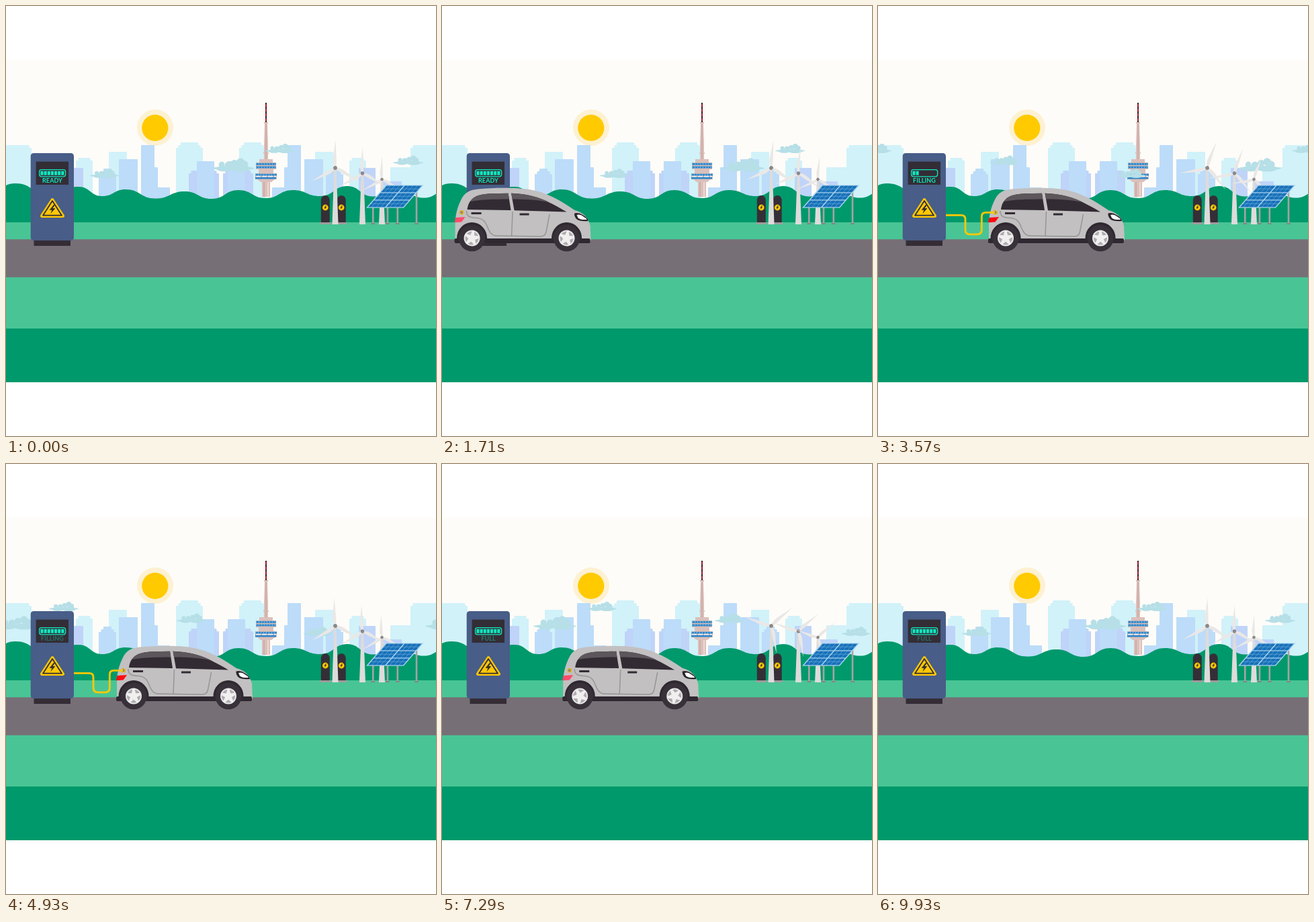
These frames come from a looping animation (640 px wide and 640 px high, 10 s). An HTML page:

```html
<!DOCTYPE html>
<html lang="en">
<head>
<meta charset="utf-8">
<title>Charging station</title>
<style>
html, body { margin: 0; width: 100%; height: 100%; overflow: hidden; background: #fff; }
svg { display: block; width: 100vw; height: 100vh; }
text { font: 700 9px Lato, sans-serif; letter-spacing: .1px; text-anchor: middle; fill: #0fe8c0; }
</style>
</head>
<body>
<svg viewBox="0 0 640 640">
  <defs>
    <g id="cloud" fill="#b6dfe7">
      <ellipse cy="4.5" rx="32" ry="2.8"/>
      <ellipse cx="-13" cy="5" rx="12" ry="4.2"/>
      <ellipse cx="11" cy="5" rx="15" ry="4.6"/>
      <circle cx="-17" cy="-1" r="4.4"/>
      <circle cx="-7" r="5.4"/>
      <circle cx="2" cy="-3" r="5"/>
      <circle cx="11" cy="-5" r="5.8"/>
      <circle cx="17" cy="-1" r="5.4"/>
    </g>
    <path id="blade" d="M-1.5 0C-2-4-4-8-3.6-13L.4-42L1.8-12L1.5 0Z"/>
    <path id="bolt" d="M1.6-6L-4 1.2H-.6L-2.4 6.2L4-1.4H.6L3.6-6Z"/>
    <path id="arch" d="M-22.500 2V0A22.500 23.500 0 0 1 22.500 0V2Z" fill="#2f2830"/>
    <pattern id="cells" width=".125" height=".1667" patternUnits="userSpaceOnUse">
      <rect width=".125" height=".1667" fill="#5fa9dc"/>
      <rect width=".112" height=".142" fill="#1870b8"/>
    </pattern>
  </defs>

  <rect y="80" width="640" height="480" fill="#fefcf8"/>
  <circle cx="222" cy="181" r="27" fill="#fdf1d2"/>
  <circle cx="221.800" cy="181.400" r="19.600" fill="#ffca00"/>
  <g id="city"></g>
  <use href="#city" transform="translate(640) scale(-1 1)"/>

  <g id="tower" fill="#dbc0bb">
    <path d="M387 144V173" stroke="#33202a" stroke-width="2"/>
    <path d="M387 146V173" stroke="#a51c2a" stroke-width="2" stroke-dasharray="4 3"/>
    <path d="M384 173h6v2h-1L390 206V228H384V206L385 175h-1Z"/>
    <path d="M383 218h8v2h-8ZM377 228h20v5h-20ZM372 233h30v10h-30ZM376 243h22v6h-22ZM371 249h32v9h-32ZM374 258h26l-5 4h-16ZM381 262h12v22h-12Z"/>
    <path d="M387 176V228M384 262V284" stroke="#c9a7a3" stroke-width="1.5"/>
    <path d="M390 262V284" stroke="#ecd9d5" stroke-width="2"/>
    <path d="M372 235.200h30m-30 4.800h30m-31 11.200h32m-32 4.800h31" stroke="#2f86c9" stroke-width="3"/>
    <path d="M372 235.200h30m-30 4.800h30m-31 11.200h32" stroke="#8fc7ea" stroke-width="1.4" stroke-dasharray="1 3"/>
    <path d="M372 253.600h30" stroke="#f6eeee" stroke-width="1.6" stroke-dasharray="7 2"/>
  </g>
  <g id="clouds"></g>
  <path id="hills" fill="#00996b"/>
  <path d="M0 322H640V482H0Z" fill="#49c595"/>
  <path d="M0 347.300H640V403.700H0Z" fill="#766f76"/>
  <path d="M0 480H640V560H0Z" fill="#00996b"/>

  <g id="pumps"></g>
  <g id="turbines"></g>
  <path d="M546.300 298v27M568 298v27M582.800 298v27M611 274v51" stroke="#a5a3a5" stroke-width="2.6"/>
  <path d="M543.500 324h5.600m16 0h5.600m9.300 0h5.600m22.600 0h5.600" stroke="#858285" stroke-width="2"/>
  <g transform="matrix(54 0 -28.500 33 566 267)">
    <rect width="1" height="1" fill="url(#cells)"/>
    <path d="M.5 0V1M0 .333H1M0 .667H1M0 0H1V1H0Z" fill="none" stroke="#a9d3ee" stroke-width=".035"/>
  </g>

  <rect x="41.500" y="345" width="54.500" height="12" fill="#352d36"/>
  <rect x="36.700" y="219" width="64.300" height="130" rx="4.500" fill="#485d87"/>
  <rect x="44.600" y="231.600" width="48.400" height="34.400" fill="#332d35"/>
  <rect x="49.600" y="243.600" width="39" height="10.200" rx="3" fill="none" stroke="#0fe8c0" stroke-width="1.3"/>
  <path id="charge" d="M51.400 248.800h36" stroke="#0fe8c0" stroke-width="6.100"/>
  <text id="label" x="69" y="263.200"></text>
  <path d="M69 288.500L53.300 312.500H84.700Z" fill="#ffc800" stroke="#ffc800" stroke-width="4.800" stroke-linejoin="round"/>
  <path d="M69 290L55 311.700H83Z" fill="none" stroke="#332d35" stroke-width="1.800" stroke-linejoin="round"/>
  <use href="#bolt" transform="translate(69 302.500) scale(1.100)" fill="#332d35"/>

  <g id="car">
    <path d="M131 349V325C131 312 134 300 140 288C145 278 152 274 165 272.600C190 270 222 270 241 273C268 277 288 290 309 304C321 307 329 314 332 327L333 349Z" fill="#c2c0c1"/>
    <rect x="130" y="346" width="202" height="7" rx="2" fill="#2f2830"/>
    <path d="M149 303C151 288 160 280.500 184 279.300L210 278.800L214 304ZM214.500 278.800C246 280 264 287 297 306.500L219 304.300Z" fill="#332b33"/>
    <path d="M153.500 291C158 283 167 280 184 279.300L210 278.800L211.300 287.500C188 287.500 168 288 153.500 291ZM214.500 278.800C240 280 256 284.500 271 292C250 288 234 287.600 216.200 287.500Z" fill="#5d575c"/>
    <path d="M148 305C148 313 152 315 163 315.500C179 316.500 177 330 184 338Q187 341.800 193 342L258 343Q265 343 266.500 336L271.500 310M216.500 306L215 342" fill="none" stroke="#979597" stroke-width="1.500"/>
    <path d="M155 307h15v3h-15ZM227 308.500h14v3h-14Z" fill="#332b33"/>
    <path d="M308.500 308.500Q315 306.500 321 311Q328.500 315 329 320Q316 321 311.500 317Q308 313 308.500 308.500Z" fill="#2b252b"/>
    <path d="M312 311Q317 309 322 313.500Q326 315.500 327 318Q317 318.500 314 315.500Z" fill="#fff"/>
    <path id="tail" d="M131.500 315L146 314L140.500 321.500L130 322.300Z"/>
    <circle cx="140.500" cy="307.200" r="2.600" fill="#8d8a8c" stroke="#edb400" stroke-width="1.300"/>
  </g>
  <path id="cable" pathLength="100" stroke-dasharray="100 200" d="M101 311.300h23q6 0 6 6v16q0 6.500 6.500 6.500h11.300q6.500 0 6.500-6.500v-20q0-6 6-6H174" fill="none" stroke="#ffc800" stroke-width="2.800"/>
</svg>
<script>
const NS = 'http://www.w3.org/2000/svg';
const $ = id => document.getElementById(id);
const add = (parent, tag, attrs = {}) => {
  const el = document.createElementNS(NS, tag);
  for (const k in attrs) el.setAttribute(k, attrs[k]);
  return parent.appendChild(el);
};
const move = (el, x, y = 0) => el.setAttribute('transform', `translate(${x} ${y})`);
const turn = (el, a) => el.setAttribute('transform', `rotate(${a})`);
const clamp = v => Math.min(1, Math.max(0, v));
const smooth = u => u * u * (3 - 2 * u);
// Repeats a shape around its origin
const spin = (parent, n, tag, attrs) => {
  for (let i = 0; i < n; i++) turn(add(parent, tag, attrs), i * 360 / n);
};

// Half of the skyline; the other half mirrors it. A block narrows in steps towards its top.
const block = (fill, left, right, top, steps = 0) => {
  for (let i = 0; i <= steps; i++)
    add($('city'), 'rect', {
      x: left + 3.5 * i, y: top + 4 * (steps - i), width: right - left - 7 * i, height: 300 - top, rx: 1, fill
    });
};
const sky = '#d1f2f9', violet = '#bfd4f8', blue = '#bcdcf9';
block(sky, -4, 38, 207, 1);
block(sky, 35, 68, 240);
block(sky, 104, 129, 226, 1);
block(sky, 153, 180, 217);
block(sky, 253, 293, 203, 2);
block(violet, 51, 80, 261);
block(violet, 90, 115, 241);
block(violet, 272, 317, 245, 1);
block(blue, 138, 164, 242, 2);
block(blue, 168, 196, 228);
block(blue, 201, 221, 207);
block(blue, 201, 226, 240);
block(blue, 224, 244, 270);
block(blue, 284, 310, 231);

// Hills: level tangents at each crest and at the dip halfway to the next
const crests = [[-70, 270], [14, 264], [108, 269], [178, 273], [266, 276], [346, 274], [427, 274], [508, 268], [584, 275], [660, 272]];
let d = 'M-70 270';
crests.forEach(([x, y], i) => {
  if (!i) return;
  const [a, b] = crests[i - 1], m = (a + x) / 2, q = (x - a) / 4, dip = (b + y) / 2 + 12;
  d += `C${a + q} ${b} ${m - q} ${dip} ${m} ${dip}S${x - q} ${y} ${x} ${y}`;
});
$('hills').setAttribute('d', d + 'V323H-70Z');

for (const x of [475.3, 499.2]) {
  const g = add($('pumps'), 'g');
  move(g, x, 300);
  add(g, 'path', { d: 'M-8 21.500h16v3.500h-16Z', fill: '#9f9b9d' });
  add(g, 'path', { d: 'M-6.500 22V-12Q-5-18 0-18T6.500-12V22Z', fill: '#352e36' });
  add(g, 'circle', { r: 4.4, fill: '#ffc800' });
  add(g, 'use', { href: '#bolt', transform: 'scale(.5)', fill: '#352e36' });
}

const turbine = (x, y, size) => {
  const g = add($('turbines'), 'g');
  move(g, x, y);
  add(g, 'path', { d: `M-1.600 0L-4.500 ${325 - y}H4.500L1.600 0Z`, fill: '#dedbdb' });
  const rotor = add(add(g, 'g', { transform: `scale(${size})`, fill: '#eae8e6' }), 'g');
  spin(rotor, 3, 'use', { href: '#blade' });
  add(rotor, 'circle', { r: 2.9, fill: '#8b888a' });
  return rotor;
};
const rotors = [turbine(490, 241, 1), turbine(530.5, 249, .93), turbine(559.5, 258, .81)];

const wheel = x => {
  const g = add($('car'), 'g');
  move(g, x, 345.5);
  add(g, 'use', { href: '#arch' });
  add(g, 'circle', { r: 19.7, fill: '#383139' });
  const rim = add(g, 'g');
  add(rim, 'circle', { r: 11, fill: '#aeacae', stroke: '#e6e4e5', 'stroke-width': 2 });
  spin(rim, 5, 'path', { d: 'M-4 0L-1.500-11H1.500L4 0Z', fill: '#f1eff0' });
  return rim;
};
const rims = [wheel(156), wheel(297)];

const cloud = (x, y, size) => {
  const g = add($('clouds'), 'g');
  for (const shift of [0, -640])
    add(g, 'use', { href: '#cloud', transform: `translate(${shift} ${y}) scale(${size})` });
  return { g, x };
};
const clouds = [cloud(146.5, 249.5, .68), cloud(338, 237, 1), cloud(408, 212.5, .69), cloud(598.5, 230, .7)];

const LOOP = 10000, CYCLE = 9930, ARRIVE = 3000, LEAVE = 6970, DRIVE = 3000, CELLS = 7;
const PITCH = 36 / CELLS;

function draw(t) {
  const p = Math.min(t / CYCLE, 1);
  for (const { g, x } of clouds) move(g, (x + 640 * p - 50) % 640 + 50);
  for (const r of rotors) turn(r, 720 * p);

  const x = -334 + 368 * smooth(clamp(t / DRIVE)) + 478 * smooth(clamp((t - LEAVE) / DRIVE));
  move($('car'), x);
  for (const r of rims) turn(r, (x - 34) * 2.9);

  const out = 1 - clamp((t - ARRIVE) / 500), back = clamp((t - 6500) / 430);
  const reach = (1 - out * out) * (1 - back);
  $('cable').setAttribute('stroke-dashoffset', 100 - 100 * reach);
  $('cable').style.display = reach > 0 ? '' : 'none';

  const filling = t >= ARRIVE && t < LEAVE;
  const level = filling ? Math.floor((t - ARRIVE) % 2000 / 2000 * (CELLS + 1)) : CELLS;
  const bar = `${PITCH - 1} 1 `.repeat(level);
  $('charge').setAttribute('stroke-dasharray', bar + '0 99');
  $('tail').setAttribute('fill', filling && t % 1000 >= 500 ? '#ff0a12' : '#ff4a6b');

  $('label').textContent = t < ARRIVE ? 'READY' : filling ? 'FILLING' : 'FULL';
  const pulse = clamp(.6 + .5 * Math.cos(2 * Math.PI * (t / 1000 - .6)));
  $('label').style.opacity = t < ARRIVE ? 1 : pulse;
}

const start = performance.now();
function tick() {
  draw((performance.now() - start) % LOOP);
  requestAnimationFrame(tick);
}
tick();
</script>
</body>
</html>
```
